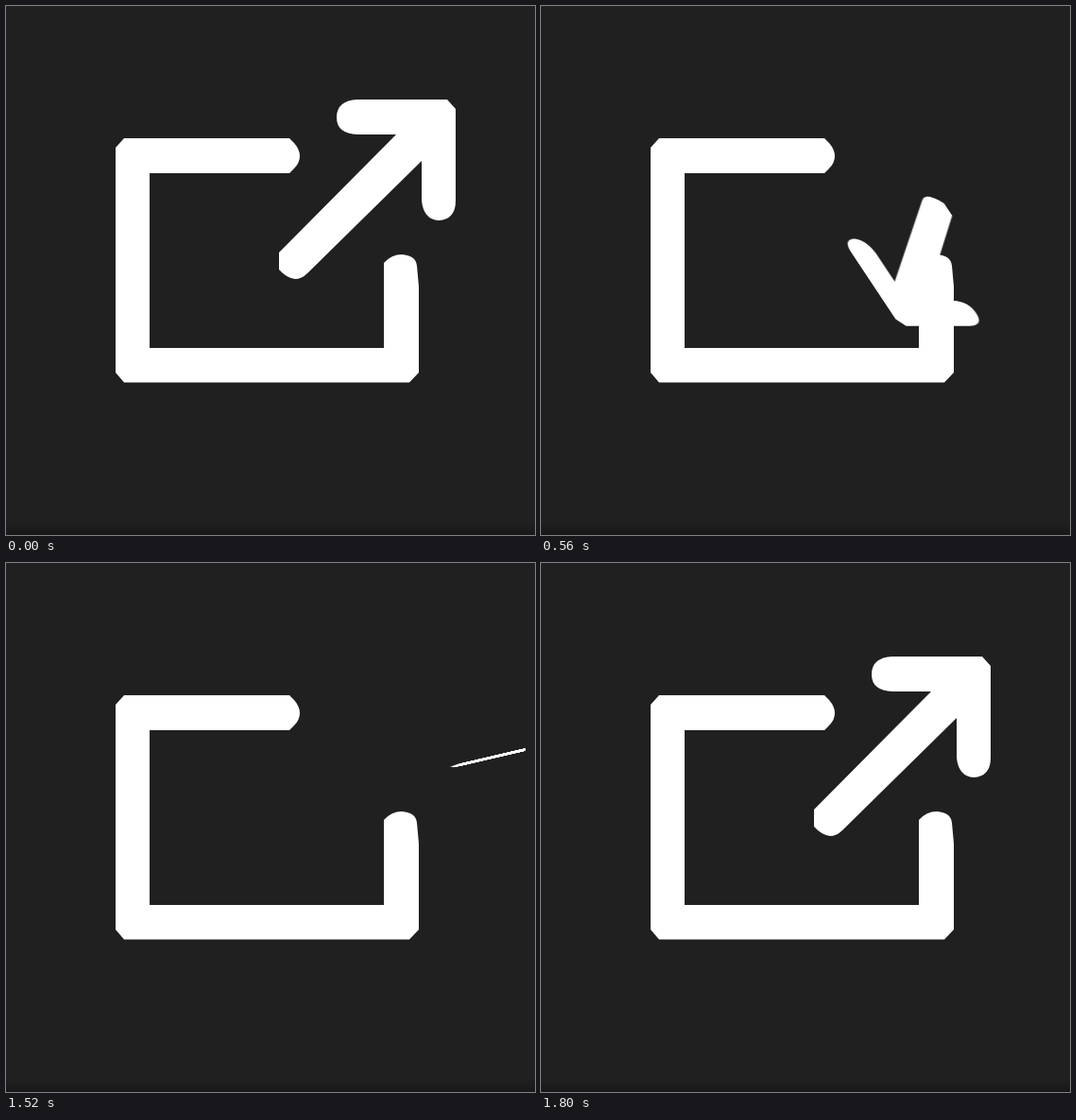
An HTML page without scripts that plays this animation: 560 px wide and 560 px high, repeating every 2.12 s.

```html
<!DOCTYPE html>
<html lang="en">
<head>
<meta charset="utf-8">
<title>Arrow toggle</title>
<style>
  html, body { margin: 0; height: 100%; overflow: hidden; background: #202020; }

  svg {
    display: block;
    width: 100vw;
    height: 100vh;
    fill: #fff;
    --out: translate(458px, 118px) rotate(0deg) skewX(0deg) scale(1, 1);
    --in: translate(269px, 310.5px) rotate(180deg) skewX(0deg) scale(1, 1);
    --settle: cubic-bezier(.333, .667, .667, 1); /* quadratic ease-out */
  }

  .soft { filter: blur(.5px); }

  /* The arrow's origin is its corner. */
  .arrow { transform-origin: 0 0; animation: swing 2120ms infinite; }

  /* Each turn: jump to a nearly edge-on pose, open up, settle. */
  @keyframes swing {
    0% { transform: var(--out); animation-timing-function: step-end; }
    24.52% {
      transform: translate(470px, 320px) rotate(180deg) skewX(60deg) scale(.6, .4);
      animation-timing-function: linear;
    }
    26.41% {
      transform: translate(384px, 325px) rotate(180deg) skewX(33.7deg) scale(.71, .72);
      animation-timing-function: var(--settle);
    }
    35.84% { transform: var(--in); animation-timing-function: step-end; }
    71.69% {
      transform: translate(640px, 178px) rotate(-6.7deg) skewX(-78deg) scale(.513, .107);
      animation-timing-function: linear;
    }
    75.47% {
      transform: translate(540.5px, 92px) rotate(0deg) skewX(-12.4deg) scale(.89, .9);
      animation-timing-function: var(--settle);
    }
    84.9%, 100% { transform: var(--out); }
  }
</style>
</head>
<body>
<svg viewBox="0 0 560 560">
  <defs>
    <linearGradient id="shade" x2="0" y2="1">
      <stop stop-color="#202020"/>
      <stop offset="1" stop-color="#181818"/>
    </linearGradient>
    <clipPath id="view"><path d="M0 0H549.5V560H0Z"/></clipPath>
  </defs>
  <rect y="546" width="560" height="14" fill="url(#shade)"/>
  <path class="soft" d="M125 140H300L305 145Q311 152 311 159Q311 166 305 172L300 177H152V362H400V272Q408 263 419 263Q434 264 435 275L437 297V388L427 398.5H125L116 388V150Z"/>
  <g class="soft" clip-path="url(#view)">
    <g class="arrow">
      <path transform="translate(-458 -118)" d="M372 99H467L476 109V206Q476 226 458 227Q442 226 440 206V164L319 283Q313 289 306 289Q297 288 289 279V261L413 136H372Q350 135 350 118Q350 100 372 99Z"/>
    </g>
  </g>
</svg>
</body>
</html>
```
